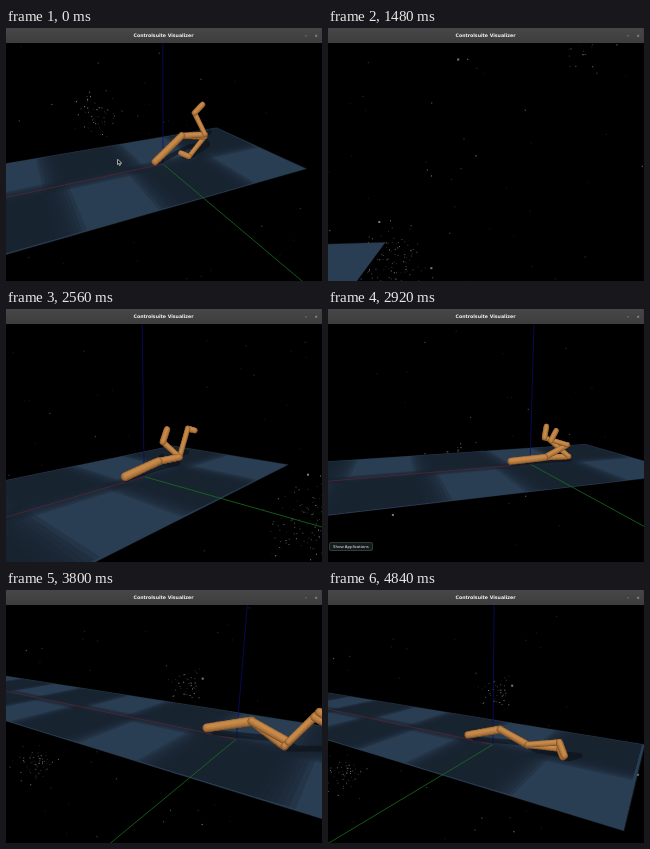
Animation, 316 px wide and 253 px high, one loop 4.88 s. Source, as an HTML page with a canvas:

```html
<!DOCTYPE html>
<html lang="en">
<head>
<meta charset="utf-8">
<title>Controlsuite Visualizer</title>
<style>
  html, body { margin: 0; width: 100%; height: 100%; overflow: hidden; background: #000; }
  canvas { position: absolute; left: 0; top: 0; }
  #bar {
    position: absolute; left: 0; top: 0; width: 315px; height: 14.6px;
    border-right: 1px solid #404040;
    background: linear-gradient(#474747, #3d3d3d); color: #f0f0f0;
    font: bold 4.7px/15px "DejaVu Sans", sans-serif; text-align: center;
  }
  #bar i { position: absolute; top: 0; font-style: normal; font-size: 4px; color: #b0b0b0; }
  #tip {
    position: absolute; left: 1px; top: 233px; width: 44px; height: 9px; box-sizing: border-box;
    border: .5px solid #333b3c; border-radius: 2px; background: #151b1c; color: #eee;
    font: 4.2px/8px "Noto Sans", sans-serif; text-align: center; white-space: nowrap;
  }
</style>
</head>
<body>
<canvas id="view" width="316" height="253"></canvas>
<div id="bar">Controlsuite Visualizer<i style="left:299px">–</i><i style="left:308.5px">×</i></div>
<div id="tip">Show Applications</div>
<script>
const LOOP = 4880, STEP = 40, CX = 158, CY = 133.5, F = 288.5, NEAR = .06;
const ctx = document.getElementById('view').getContext('2d');
const tip = document.getElementById('tip');

// Camera stops: arrive, leave, azimuth, pitch, then screen place and depth of the world origin
const stops = [
  [0, 1120, 243.2, 24.5, 157, 136, 4],
  [1480, 1880, 174.6, 3.7, -269, 349, 1.277],
  [2240, 2240, 196, 9.5, 50, 185, 2.58],
  [2920, 2920, 252.4, 10.5, 202, 155, 4],
  [3480, 3480, 305.5, 18.5, 302, 147, 2.5],
  [4200, 4200, 302, 17.2, 169, 151, 3.66],
  [4840, 4840, 301.5, 16.5, 165, 154.5, 3.66]
];

// Walker poses: time, head position, then angles of torso, thigh, shin, other thigh, other shin
const poses = [
  [0, .12, 37, -11, -130, -6, 120],
  [560, .14, 31, -28, 0, -12, 60],
  [2240, .26, 14, -3, -2, -25, 126],
  [2920, .285, 2, -2, 141, 24, 162],
  [3480, .384, 10, -20, 80, 0, 90],
  [4200, .29, 29, -45, 28, -48, 15],
  [4840, .385, 18, -19, 15, -20, 5]
];

const mix = (a, b, k) => a.map((v, i) => v + (b[i] - v) * k);
const dot = (a, b) => a[0] * b[0] + a[1] * b[1] + a[2] * b[2];
const rad = d => d * Math.PI / 180;

// Straight run between the two keys around t
function sample(keys, t) {
  const i = Math.max(1, keys.findIndex(k => k[0] > t)), a = keys[i - 1], b = keys[i];
  return t >= keys.at(-1)[0] ? keys.at(-1).slice(1) : mix(a, b, (t - a[0]) / (b[0] - a[0])).slice(1);
}

const shots = stops.flatMap(([from, to, az, pitch, x, y, z]) => {
  const view = [az, pitch, (x - CX) / F * z, (CY - y) / F * z, z];
  return from === to ? [[from, ...view]] : [[from, ...view], [to, ...view]];
});

function camera(t) {
  const [az, pitch, ...o] = sample(shots, t), a = rad(az), p = rad(pitch);
  const ca = Math.cos(a), sa = Math.sin(a), cp = Math.cos(p), sp = Math.sin(p);
  return { o, r: [sa, -ca, 0], u: [sp * ca, sp * sa, cp], w: [cp * ca, cp * sa, -sp] };
}

const turn = (c, p) => [dot(p, c.r), dot(p, c.u), dot(p, c.w)];
const toCam = (c, p) => turn(c, p).map((v, i) => v + c.o[i]);
const toScreen = q => [CX + F * q[0] / q[2], CY - F * q[1] / q[2]];

// ---- stars ----
let seed = 11;
const rnd = () => (seed = seed * 16807 % 2147483647) / 2147483647;
const bell = () => rnd() + rnd() + rnd() - 1.5;
const stars = [];

function addStar(az, el, lum, size = 1) {
  const a = rad(az), e = rad(el);
  stars.push({ d: [Math.cos(e) * Math.cos(a), Math.cos(e) * Math.sin(a), Math.sin(e)], lum, size });
}

for (let i = 0; i < 600; i++) addStar(rnd() * 360, Math.asin(rnd() * 2 - 1) * 180 / Math.PI, .08 + .45 * rnd() ** 3, 1.2);

// azimuth, elevation, spread, count
const clusters = [[257, -14.5, 4.5, 50], [194, -23, 6.5, 130], [330, -23.5, 3.2, 55], [299, -11, 3.2, 40], [156, 17, 3, 18]];
for (const [az, el, spread, n] of clusters)
  for (let i = 0; i < n; i++)
    addStar(az + bell() * spread, el + bell() * spread, .15 + .5 * rnd() ** 2);

const beacons = [[195.2, -14.6], [185.6, -23.6], [296.3, -9], [271.4, -23.4], [180, 15.7]];
for (const [az, el] of beacons) addStar(az, el, .55, 2);

function drawStars(c) {
  for (const { d, lum, size } of stars) {
    const q = turn(c, d);
    if (q[2] < .3) continue;
    const [x, y] = toScreen(q);
    ctx.fillStyle = `rgba(226,230,224,${lum})`;
    ctx.fillRect(x - size / 2, y - size / 2, size, size);
  }
}

// ---- floor and axes ----
function clip(pts) {
  const out = [];
  pts.forEach((a, i) => {
    const b = pts[(i + 1) % pts.length];
    if (a[2] >= NEAR) out.push(a);
    if ((a[2] >= NEAR) !== (b[2] >= NEAR)) out.push(mix(a, b, (NEAR - a[2]) / (b[2] - a[2])));
  });
  return out;
}

function trace(c, world) {
  ctx.beginPath();
  clip(world.map(p => toCam(c, p))).forEach(q => ctx.lineTo(...toScreen(q)));
}

const X0 = -1.64, X1 = 36, TILE = 1.02;
const rect = (x0, y0, x1, y1) => [[x0, y0, 0], [x1, y0, 0], [x1, y1, 0], [x0, y1, 0]];
const FLOOR = rect(X0, -1, X1, 1);

function drawFloor(c) {
  trace(c, FLOOR);
  ctx.fillStyle = '#2a3e53';
  ctx.fill();
  // Dark tiles, layered for soft borders
  ctx.fillStyle = 'rgba(24,34,46,.3)';
  for (let i = 0; i < 36; i++) {
    const far = i % 2 === 0, x = X0 + i * TILE;
    for (let k = 0; k < 8; k++) {
      const e = .14 - k * .04;
      trace(c, rect(i ? x - e : X0 + .03, far ? -.98 : -e, x + TILE + e, far ? e : .98));
      ctx.fill();
    }
  }
  trace(c, FLOOR);
  ctx.closePath();
  ctx.strokeStyle = 'rgba(50,70,92,.4)';
  ctx.lineWidth = .7;
  ctx.stroke();
}

function drawAxis(c, end, color) {
  trace(c, [[0, 0, 0], end]);
  ctx.strokeStyle = color;
  ctx.lineWidth = 1;
  ctx.stroke();
}

// ---- walker ----
const TORSO = { len: .51, r: .048 }, THIGH = { len: .39, r: .041 }, SHIN = { len: .39, r: .034 }, FOOT = { len: .16, r: .038 };
const ANKLE = -80;

function skeleton(t) {
  const [x, torso, ...legs] = sample(poses, t), bones = [];
  const grow = (a, { len, r }, deg) => {
    const b = [a[0] - len * Math.cos(rad(deg)), 0, Math.max(.03, a[2] + len * Math.sin(rad(deg)))];
    bones.push({ a, b, r });
    return b;
  };
  const hip = grow([x, 0, .06], TORSO, torso);
  for (const [thigh, shin] of [legs.slice(0, 2), legs.slice(2)])
    grow(grow(grow(hip, THIGH, thigh), SHIN, shin), FOOT, shin + ANKLE);
  return bones;
}

const SKIN = [['#80532b', 1, 0], ['#a66f39', .84, .05], ['#b97e42', .62, .11], ['#c68a4a', .36, .17]];

function drawBone(c, { a, b, r }) {
  const p = toCam(c, a), q = toCam(c, b), n = 8;
  for (const [color, wide, up] of SKIN) {
    ctx.strokeStyle = color;
    for (let i = 0; i < n; i++) {
      const s = mix(p, q, i / n), e = mix(p, q, (i + 1) / n);
      if (Math.min(s[2], e[2]) < .2) continue;
      const w = 4 * r * F / (s[2] + e[2]), [x0, y0] = toScreen(s), [x1, y1] = toScreen(e);
      ctx.lineWidth = w * wide;
      ctx.beginPath();
      ctx.moveTo(x0, y0 - w * up);
      ctx.lineTo(x1, y1 - w * up);
      ctx.stroke();
    }
  }
}

function drawShadow(c, bones) {
  const cast = p => toCam(c, [p[0] - p[2], -1.1 * p[2], 0]);
  ctx.save();
  trace(c, FLOOR);
  ctx.clip();
  ctx.beginPath();
  for (const { a, b } of bones) {
    const p = cast(a), q = cast(b);
    if (Math.min(p[2], q[2]) < .2) continue;
    ctx.moveTo(...toScreen(p));
    ctx.lineTo(...toScreen(q));
  }
  ctx.lineWidth = .06 * F / c.o[2];
  ctx.strokeStyle = 'rgba(10,15,23,.6)';
  ctx.stroke();
  ctx.restore();
}

function drawWalker(c, t) {
  const bones = skeleton(t), depth = ({ a, b }) => toCam(c, a)[2] + toCam(c, b)[2];
  ctx.lineCap = 'round';
  drawShadow(c, bones);
  bones.sort((m, n) => depth(n) - depth(m)).forEach(bone => drawBone(c, bone));
}

function drawCursor(x, y) {
  ctx.beginPath();
  [[0, 0], [0, 5], [1.2, 4], [2, 6], [3, 5.5], [2.2, 3.7], [3.8, 3.6]]
    .forEach(([dx, dy]) => ctx.lineTo(x + dx, y + dy));
  ctx.closePath();
  ctx.fillStyle = '#111';
  ctx.fill();
  ctx.strokeStyle = '#e4e4e4';
  ctx.lineWidth = .7;
  ctx.stroke();
}

function draw(now) {
  const t = Math.floor(now % LOOP / STEP) * STEP, c = camera(t);
  ctx.fillStyle = '#000';
  ctx.fillRect(0, 0, 316, 253);
  drawStars(c);
  drawFloor(c);
  drawAxis(c, [14, 0, 0], 'rgba(105,38,48,.6)');
  drawAxis(c, [0, 10, 0], 'rgba(24,110,30,.8)');
  drawAxis(c, [0, 0, 10], 'rgba(12,12,110,.75)');
  drawWalker(c, t);
  if (t < 1160) drawCursor(111.5, 131.5);
  tip.style.visibility = t >= 2720 && t < 3160 ? 'visible' : 'hidden';
}

const start = performance.now();
(function tick() {
  draw(performance.now() - start);
  requestAnimationFrame(tick);
})();
</script>
</body>
</html>
```
